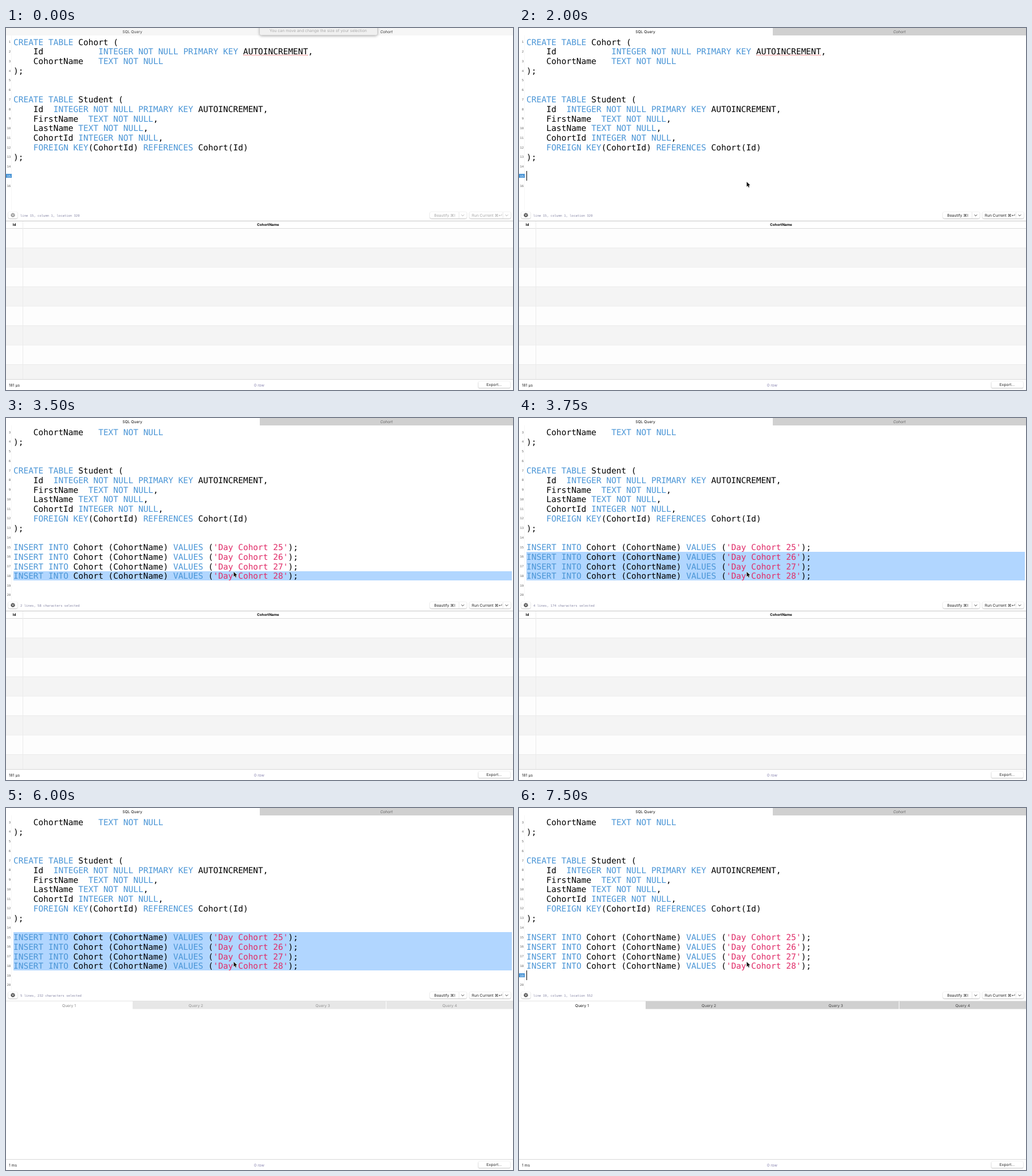
An HTML page with a canvas for the animation above (8 s loop, 885x633 px).

```html
<!DOCTYPE html>
<html lang="en">
<head>
<meta charset="utf-8">
<title>SQL Query</title>
<style>
html, body { margin: 0; width: 100%; height: 100%; overflow: hidden; background: #fff; }
canvas { display: block; }
</style>
</head>
<body>
<canvas id="stage" width="885" height="633"></canvas>
<script>
const ctx = document.getElementById('stage').getContext('2d');
const LOOP = 8000, W = 885, H = 633;
const LINE = 16.75, CHAR = 8.717, LEFT = 13;
const MONO = '"DejaVu Sans Mono", monospace';
const SANS = 'Inter, "DejaVu Sans", sans-serif';
const BLUE = '#4a95d6', PINK = '#e02c68', GREY = '#d0d0d0';

const schema = `CREATE TABLE Cohort (
    Id           INTEGER NOT NULL PRIMARY KEY AUTOINCREMENT,
    CohortName   TEXT NOT NULL
);


CREATE TABLE Student (
    Id  INTEGER NOT NULL PRIMARY KEY AUTOINCREMENT,
    FirstName  TEXT NOT NULL,
    LastName TEXT NOT NULL,
    CohortId INTEGER NOT NULL,
    FOREIGN KEY(CohortId) REFERENCES Cohort(Id)
);
`.split('\n');
const inserts = [25, 26, 27, 28].map(n =>
  `INSERT INTO Cohort (CohortName) VALUES ('Day Cohort ${n}');`);

function rect(x, y, w, h, color) {
  ctx.fillStyle = color;
  ctx.fillRect(x, y, w, h);
}

function text(str, x, y, color, font, align = 'left') {
  ctx.font = font;
  ctx.textAlign = align;
  ctx.fillStyle = color;
  ctx.fillText(str, x, y);
}

const label = (str, x, y, color = '#222', align = 'center', size = 6.7, style = '') =>
  text(str, x, y, color, `${style} ${size}px ${SANS}`, align);

function stroke(points, color, width = 1) {
  ctx.beginPath();
  points.forEach(([x, y]) => ctx.lineTo(x, y));
  ctx.strokeStyle = color;
  ctx.lineWidth = width;
  ctx.stroke();
}

function box(x, y, w, h, r, fill, shadow, blur = 1.5, dy = 0.5) {
  ctx.save();
  ctx.shadowColor = shadow;
  ctx.shadowBlur = blur;
  ctx.shadowOffsetY = dy;
  ctx.beginPath();
  ctx.roundRect(x, y, w, h, r);
  ctx.fillStyle = fill;
  ctx.fill();
  ctx.restore();
}

const button = (x, y, w, h) => box(x, y, w, h, 2.5, '#fff', 'rgba(0,0,0,.4)');

function splitButton(x, w, split, str, strX, ink) {
  button(x, 321.5, w, 11.5);
  rect(split, 322, 0.7, 11, '#ddd');
  label(str, strX, 330, ink, 'left');
  const c = (split + x + w) / 2;
  stroke([[c - 2.3, 326.4], [c, 328.7], [c + 2.3, 326.4]], ink, 0.9);
}

function gear(x, y, color) {
  for (let i = 0; i < 8; i++) {
    const c = Math.cos(i * Math.PI / 4), s = Math.sin(i * Math.PI / 4);
    stroke([[x + c, y + s], [x + 4 * c, y + 4 * s]], color, 1);
  }
  ctx.beginPath();
  ctx.arc(x, y, 2.6, 0, 7);
  ctx.stroke();
}

function codeLine(str, baseline, colored) {
  let col = 0;
  for (const part of str.split(/('.*?'|\b[A-Z]{2,}\b)/)) {
    const keyword = /^[A-Z]{2,}$/.test(part) && part !== 'AUTOINCREMENT';
    const color = !colored ? '#000' : part[0] === "'" ? PINK : keyword ? BLUE : '#000';
    text(part, LEFT + col * CHAR, baseline, color, `14.48px ${MONO}`);
    col += part.length;
  }
}

function tabBar(t, active) {
  rect(0, 0, W, 13, active ? '#fff' : '#f6f6f6');
  if (active) rect(443, 0, 442, 13, GREY);
  label('SQL Query', 220.5, 9.4, active ? '#111' : '#444');
  label('Cohort', 664, 9.4, active ? '#666' : '#333', 'center', 6.7, 'italic');
  if (t < 250) {
    box(443, -6, 205, 18.5, 3, '#f0f0f0', 'rgba(0,0,0,.4)', 5, 1);
    label('You can move and change the size of your selection', 545, 6.6, '#aaa', 'center', 6.9);
  }
}

function editor(t) {
  const pasted = t >= 2250;
  const top = pasted ? -17.2 : 15.9;
  const rowY = n => top + (n - 1) * LINE;
  const lines = pasted ? [...schema, ...inserts, '', ''] : [...schema, '', ''];
  const selecting = t >= 3500 && t < 7500;
  const firstSelected = t < 3750 ? 18 : t < 4250 ? 16 : 15;
  const current = selecting ? 0 : !pasted ? 15 : t < 2500 ? 16 : 19;

  rect(9.5, 13, 0.5, 305, '#eee');
  if (selecting) {
    const y = Math.round(rowY(firstSelected));
    rect(LEFT, y, 870, 284 - y, '#b1d6ff');
  }
  for (let n = pasted ? 3 : 1; n <= lines.length; n++) {
    const y = rowY(n);
    if (n === current) rect(0, Math.round(y + 4.6), 10, 7, BLUE);
    text(n, 8, y + 10.4, n === current ? '#fff' : '#555', `5.2px ${MONO}`, 'right');
    codeLine(lines[n - 1], y + 13.8, n < 15 || t >= 2750);
  }
  if (!pasted) {
    for (let x = 414; x < 527; x += 2) rect(x, 47, 1, 1, '#f03a3a');
  }

  const caretOn = t >= 1000 && !selecting && !(t >= 1500 && t < 2000) && !(t >= 3250 && t < 3500);
  if (caretOn) rect(LEFT, pasted ? 284 : 250, 1, 17, '#000');

  const count = 19 - firstSelected;
  return selecting
    ? `${count + 1} lines, ${count * 58} characters selected`
    : `line ${current}, column 1, location ${pasted ? 552 : 320}`;
}

function toolbar(status, active) {
  const ink = active ? '#222' : '#a5a5a5';
  button(4, 321.5, 16, 11.5);
  gear(12, 327.2, active ? '#333' : '#888');
  text(status, 25, 329.6, '#8484a4', `5.56px ${MONO}`);
  splitButton(740, 64, 790.5, 'Beautify ⌘I', 747.5, ink);
  splitButton(809, 72, 867, 'Run Current ⌘↵', 813, ink);
}

function table() {
  for (let i = 0; i < 8; i++) {
    const y = 350 + i * 34;
    rect(0, y, W, 34, i % 2 ? '#f4f4f4' : '#fdfdfd');
    rect(0, y, W, 0.6, '#e6e6e6');
  }
  rect(0, 337, W, 1, '#c8c8c8');
  rect(0, 350, W, 1, '#dcdcdc');
  rect(29, 338, 1, 276, '#ebebeb');
  label('Id', 14.6, 346.2, '#000', 'center', 6.2, 'bold');
  label('CohortName', 457.5, 346.2, '#000', 'center', 6.2, 'bold');
}

function queryTabs(t) {
  ctx.globalAlpha = t < 6250 ? 0.5 : 1;
  for (let i = 0; i < 4; i++) {
    const x = i * 221.5;
    if (i) rect(Math.round(x - 0.6), 338, 221, 13.5, GREY);
    label('Query ' + (i + 1), x + 110, 347.6, i ? '#444' : '#111');
  }
  ctx.globalAlpha = 1;
  rect(0, 337, W, 0.7, '#d8d8d8');
}

function footer(done) {
  rect(0, 614, W, 19, '#fff');
  rect(0, 614, W, 1, '#d8d8d8');
  label(done ? '1 ms' : '181 µs', 5, 626.6, '#222', 'left');
  label('0 row', 442, 626.6, '#8580ae');
  button(824.5, 618, 55.5, 11.5);
  label('Export...', 852, 626.2);
}

function pointer(t) {
  if (t < 250) return;
  const [x, y] = t < 500 ? [456, 204] : t < 750 ? [404, 261] : [397, 268.5];
  const shape = [[0, 0], [0, 8.4], [1.9, 6.7], [3.3, 9.8], [4.7, 9.2], [3.4, 6.2], [6, 6], [0, 0]];
  const points = shape.map(([dx, dy]) => [x + 0.5 + dx, y + 0.5 + dy]);
  stroke(points, '#fff', 1.2);
  ctx.fillStyle = '#111';
  ctx.fill();
}

function draw(t) {
  const active = t >= 1000, done = t >= 6000;
  ctx.textRendering = 'geometricPrecision';
  rect(0, 0, W, H, '#fff');
  const status = editor(t);
  tabBar(t, active);
  toolbar(status, active);
  if (done) queryTabs(t); else table();
  footer(done);
  pointer(t);
}

const start = performance.now();
function frame() {
  draw((performance.now() - start) % LOOP);
  requestAnimationFrame(frame);
}
frame();
</script>
</body>
</html>
```
